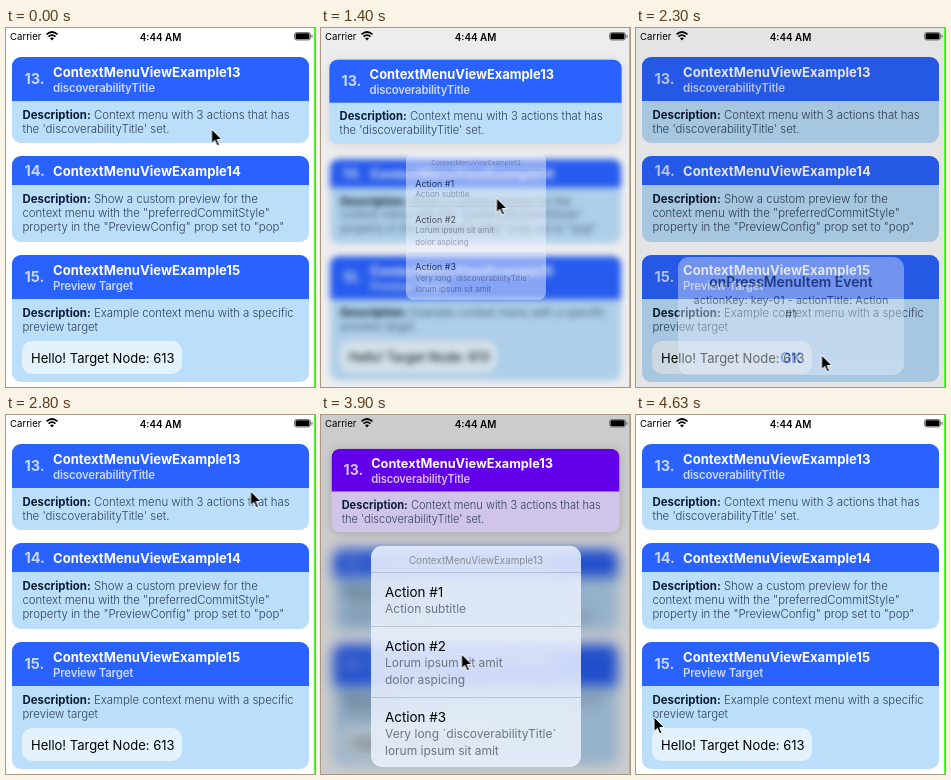
Write an HTML page that moves like this. It is 309 by 359 pixels and loops after 4760 ms.

```html
<!DOCTYPE html>
<html lang="en">
<head>
<meta charset="utf-8">
<title>Context menu demo</title>
<style>
  html, body { margin: 0; width: 100%; height: 100%; overflow: hidden; background: #fff; }
  #stage { position: relative; width: 309px; height: 359px; overflow: hidden; background: #fff;
    font-family: Inter, Roboto, sans-serif; }
  #stage div, #stage svg { position: absolute; }
  .fill { inset: 0; }
  .shade { inset: 0; background: #000; opacity: 0; }
  .text { line-height: 20px; white-space: pre; color: #000; }
  .mid { left: 0; width: 100%; text-align: center; }
  .card { left: 6px; width: 297px; border-radius: 9px; overflow: hidden; background: #bbdefb; }
  .head { left: 0; top: 0; width: 100%; background: #2962ff; }
  .title { font-size: 13.1px; font-weight: 700; color: #fff; }
  .num { font-size: 14.5px; font-weight: 700; color: rgba(255,255,255,.75); }
  .sub { font-size: 11.5px; font-weight: 600; letter-spacing: -.2px; color: rgba(255,255,255,.75); }
  .desc { font-size: 11.4px; font-weight: 300; color: #2f4156; }
  .desc b { font-weight: 700; color: #0c1d33; }
  .pill { left: 10px; top: 86px; width: 160px; height: 33px; border-radius: 10px; background: #e3f2fd; }
  .node { font-size: 13px; }
  #menu { left: 50px; top: 131px; width: 210px; height: 221px; border-radius: 11px; overflow: hidden;
    background: rgba(238,244,255,.84); transform-origin: 50% 0; opacity: 0; }
  .caption { font-size: 9.8px; color: #858b96; }
  .action { font-size: 13.4px; }
  .hint { font-size: 12px; color: #6d7380; }
  .rule { left: 0; width: 100%; height: 1px; background: rgba(60,70,100,.2); }
  #alert { left: 44px; top: 230px; width: 222px; height: 116px; border-radius: 11px; opacity: 0;
    background: linear-gradient(rgba(218,228,252,.84), rgba(232,241,255,.88)); }
  .alert-title { font-size: 13.65px; font-weight: 600; color: #1c1f28; }
  .message { font-size: 10.75px; color: #1c1f28; }
  .ok { font-size: 14.4px; font-weight: 700; color: #3f78ee; }
  .carrier { font-size: 9.6px; }
  .clock { font-size: 9.9px; font-weight: 600; }
  #edge { left: 308px; top: 0; width: 1px; height: 100%; background: #4dff2a; }
  #cursor { left: 0; top: 0; overflow: visible; }
</style>
</head>
<body>
<div id="stage">
  <div id="page" class="fill"></div>
  <div id="dim" class="shade"></div>
  <div id="front" class="fill"></div>
  <div id="menu"></div>
  <div id="alertDim" class="shade"></div>
  <div id="alert"></div>
  <div id="status" class="fill">
    <svg width="309" height="18">
      <path d="M40.5 6.3Q46 1.7 51.5 6.3M42.5 8.6Q46 5.6 49.5 8.6" fill="none" stroke="#000" stroke-width="1.7"/>
      <path d="M44 10.2Q46 8.7 48 10.2L46 12.4Z"/>
      <rect x="288.5" y="4.5" width="16" height="7.5" rx="2.2" fill="none" stroke="#777"/>
      <rect x="289.5" y="5.3" width="14" height="6" rx="1.3"/>
      <rect x="305.4" y="6.8" width="1.2" height="3" rx=".6" fill="#777"/>
    </svg>
  </div>
  <div id="edge"></div>
  <svg id="cursor" width="12" height="18">
    <path d="M0 0V14.5L3.4 11.4L5.8 17L8 16L5.7 10.6H10.4Z" stroke="#fff"/>
  </svg>
</div>
<script>
const $ = id => document.getElementById(id);

function box(parent, cls, style = {}) {
  const el = document.createElement('div');
  el.className = cls;
  Object.assign(el.style, style);
  parent.append(el);
  return el;
}

// y is the middle of the capitals; a null x centres the line.
function text(parent, cls, x, y, html) {
  const el = box(parent, 'text ' + cls + (x === null ? ' mid' : ''), { top: y - 10 + 'px' });
  if (x !== null) el.style.left = x + 'px';
  el.innerHTML = html;
}

function card(parent, number, height, subtitle, ...lines) {
  const headHeight = subtitle ? 44 : 29;
  const el = box(parent, 'card', { top: 29 + 99 * (number - 13) + 'px', height: height + 'px' });
  const head = box(el, 'head', { height: headHeight + 'px' });
  text(head, 'num', 12.5, headHeight / 2, number + '.');
  text(head, 'title', 41, 15, 'ContextMenuViewExample' + number);
  text(head, 'sub', 41, 30.5, subtitle);
  lines.forEach((line, i) =>
    text(el, 'desc', 10.5, headHeight + 13.5 + i * 14, (i ? '' : '<b>Description:</b> ') + line));
  return { el, head };
}

const first = card($('front'), 13, 86, 'discoverabilityTitle',
  'Context menu with 3 actions that has', "the 'discoverabilityTitle' set.");
card($('page'), 14, 86, '',
  'Show a custom preview for the',
  'context menu with the "preferredCommitStyle"',
  'property in the "PreviewConfig" prop set to "pop"');
const last = card($('page'), 15, 127, 'Preview Target',
  'Example context menu with a specific', 'preview target');
text(box(last.el, 'pill'), 'node', 9, 17, 'Hello! Target Node: 613');

text($('menu'), 'caption', null, 14.5, 'ContextMenuViewExample13');
let top_ = 26;
[
  ['Action subtitle'],
  ['Lorum ipsum sit amit', 'dolor aspicing'],
  ['Very long `discoverabilityTitle`', 'lorum ipsum sit amit']
].forEach((hints, i) => {
  box($('menu'), 'rule', { top: top_ + 'px' });
  text($('menu'), 'action', 14, top_ + 19.5, 'Action #' + (i + 1));
  hints.forEach((hint, k) => text($('menu'), 'hint', 14, top_ + 37 + k * 17, hint));
  top_ += 37 + 17 * hints.length;
});

text($('alert'), 'alert-title', null, 24.5, 'onPressMenuItem Event');
text($('alert'), 'message', null, 43, 'actionKey: key-01 - actionTitle: Action');
text($('alert'), 'message', null, 56.5, '#1');
text($('alert'), 'ok', null, 99, 'OK');

text($('status'), 'carrier', 4, 8.5, 'Carrier');
text($('status'), 'clock', null, 8.5, '4:44 AM');

const LOOP = 4760, TICK = 100;
const ramp = (t, from, to) => Math.min(1, Math.max(0, (t - from) / (to - from)));
const easeOut = p => 1 - (1 - p) ** 2;
const smooth = p => p * p * (3 - 2 * p);

// The picture moves in ticks and skips a beat at each stall.
const stalls = [1500, 2900, 4400];
const ticks = Array.from({ length: Math.ceil(LOOP / TICK) }, (_, i) => i * TICK)
  .filter(t => !stalls.includes(t));

function play(el, pose) {
  const frames = ticks.map(t => ({ offset: t / LOOP, easing: 'steps(1, end)', ...pose(t) }));
  frames.push({ ...frames[frames.length - 1], offset: 1 });
  el.animate(frames, { duration: LOOP, iterations: Infinity });
}

const lift = t => .034 * (ramp(t, 300, 400) - ramp(t, 400, 600) + ramp(t, 2900, 3300) - ramp(t, 3400, 3600));
const open = t => easeOut(ramp(t, 400, 700)) - ramp(t, 1300, 1500)
  + easeOut(ramp(t, 3400, 3800)) - ramp(t, 4200, 4400);
const alertIn = t => easeOut(ramp(t, 1500, 2000));
const alertOut = t => ramp(t, 2100, 2500);
const alertShown = t => alertIn(t) - alertOut(t);

const tint = (t, blue, purple) => ({ backgroundColor: open(t) > .6 ? purple : blue });

play(first.head, t => tint(t, '#2962ff', '#6200ea'));
play(first.el, t => ({
  ...tint(t, '#bbdefb', '#d1c4e9'),
  transform: `translateY(${3.5 * open(t)}px) scale(${(1 + lift(t)) * (1 - .03 * open(t))})`,
  boxShadow: `0 1px 10px rgba(0,0,0,${Math.min(.2, lift(t) * 6 + open(t) * .2)})`
}));
play($('page'), t => ({
  transform: `translateY(${4 * open(t)}px) scale(${1 - .04 * open(t)})`,
  filter: `blur(${6.5 * open(t)}px)`
}));
play($('dim'), t => ({ opacity: .2 * open(t) ** 1.5 }));
play($('menu'), t => ({
  transform: `translateY(${-13 * (1 - open(t))}px) scale(${(1 + 2 * open(t)) / 3})`,
  opacity: Math.min(1, open(t) * 1.15)
}));
play($('alert'), t => ({
  opacity: alertShown(t),
  transform: `scale(${1 + .28 * (1 - alertIn(t)) + .036 * alertOut(t)})`
}));
play($('alertDim'), t => ({ opacity: .21 * alertShown(t) }));

// Pointer moves: start, end, dx, dy
const moves = [
  [300, 700, -30, 69],
  [1500, 1800, 18, 87],
  [1800, 2100, -33, 70],
  [2100, 2300, 25, 0],
  [2300, 2800, 59, -251],
  [3400, 3900, -104, 163],
  [3900, 4200, -122.5, 63]
];
play($('cursor'), t => {
  let x = 205.5, y = 101;
  for (const [from, to, dx, dy] of moves) {
    const p = smooth(ramp(t, from, to));
    x += dx * p;
    y += dy * p;
  }
  return { transform: `translate(${x}px, ${y}px)` };
});
</script>
</body>
</html>
```
